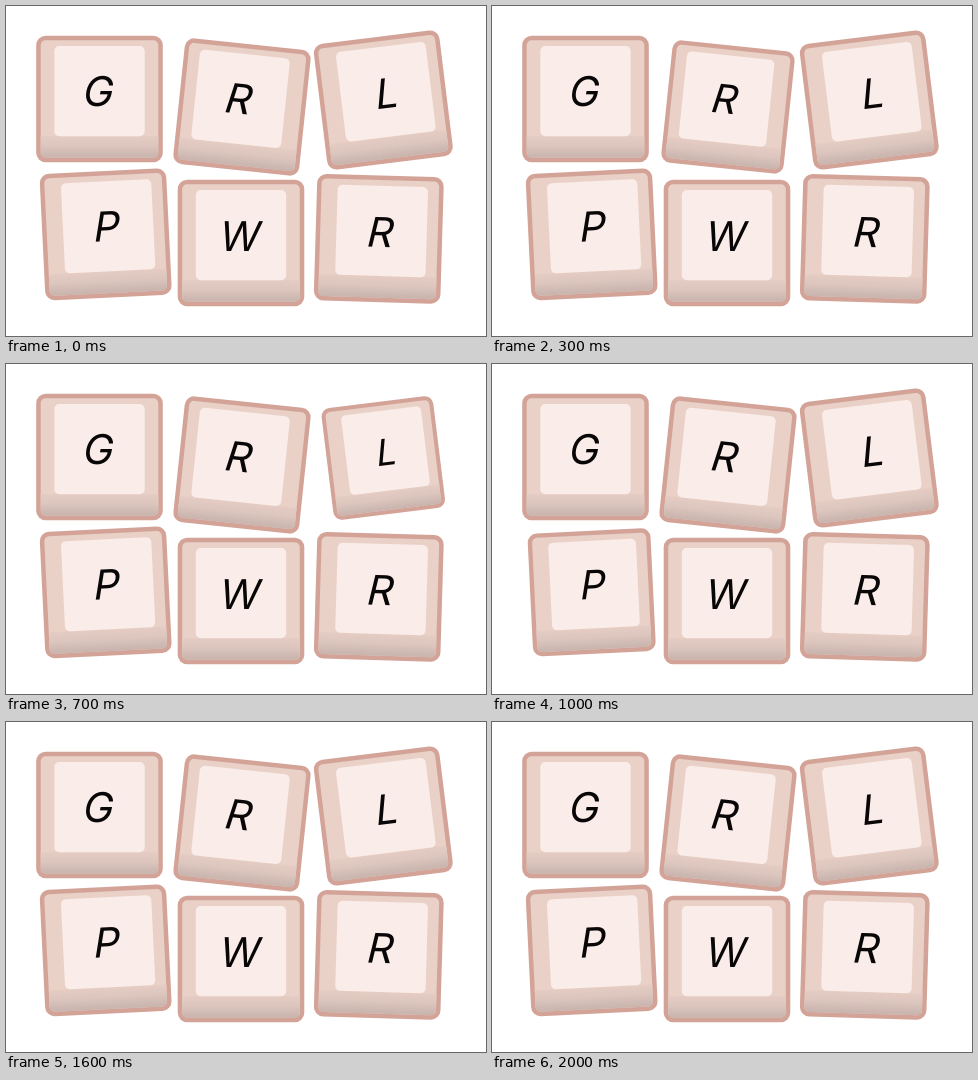
These frames come from a looping animation (480x330 px, 2.1 s). An HTML page with a canvas:

```html
<!DOCTYPE html>
<html lang="en">
<head>
<meta charset="utf-8">
<title>Keycaps</title>
<style>
html, body { margin: 0; width: 480px; height: 330px; overflow: hidden; background: #fff; }
canvas { display: block; }
</style>
</head>
<body>
<canvas id="stage" width="480" height="330"></canvas>
<script>
const ctx = document.getElementById('stage').getContext('2d');
const LOOP = 2100, STEP = 100, PRESS = 250, DEPTH = 0.15;
const SLANT = -0.045;

// Centre, tilt in degrees, sideways shift of the top face,
// letter offset inside the key, start of the press
const keys = [
  { char: 'G', x: 93.5, y: 93, tilt: 0, face: 0, dx: 0, dy: -8, start: 25 },
  { char: 'R', x: 236, y: 101, tilt: 6, face: -2.3, dx: -2.9, dy: -8.2, start: 275 },
  { char: 'L', x: 377.3, y: 94, tilt: -7, face: 3.5, dx: 3.5, dy: -6.6, start: 625 },
  { char: 'P', x: 99.7, y: 228.3, tilt: -2.8, face: 2.8, dx: 2.7, dy: -8.2, start: 975 },
  { char: 'W', x: 235, y: 237, tilt: 0, face: 0, dx: 2.5, dy: -7.5, start: 1325 },
  { char: 'R', x: 372.8, y: 232.8, tilt: 1.7, face: 2.6, dx: 2.5, dy: -6.9, start: 1725 }
];

const shade = ctx.createLinearGradient(0, 36, 0, 59);
shade.addColorStop(0, '#e6cdc4');
shade.addColorStop(0.45, '#dcc6be');
shade.addColorStop(1, '#c8b3ad');

function box(x, y, w, h, r, fill) {
  ctx.fillStyle = fill;
  ctx.beginPath();
  ctx.roundRect(x, y, w, h, r);
  ctx.fill();
}

function drawLetter(char, x, y) {
  ctx.font = 'italic 400 41px Inter, "Liberation Sans", sans-serif';
  ctx.fillStyle = '#080606';
  ctx.translate(x, y);
  ctx.transform(1, 0, SLANT, 1, 0, 0);
  const m = ctx.measureText(char);
  ctx.fillText(char,
    (m.actualBoundingBoxLeft - m.actualBoundingBoxRight) / 2,
    (m.actualBoundingBoxAscent - m.actualBoundingBoxDescent) / 2);
}

function keyScale(t, start) {
  const p = (t - start) / PRESS;
  return p > 0 && p < 1 ? 1 - DEPTH * Math.sin(Math.PI * p) ** 1.4 : 1;
}

function drawKey(key, t) {
  const s = keyScale(t, key.start);
  ctx.save();
  ctx.translate(key.x, key.y);
  ctx.rotate(key.tilt * Math.PI / 180);
  ctx.scale(s, s);
  box(-63.3, -63.3, 126.6, 126.6, 9.5, '#d3a398');
  box(-58.8, -58.8, 117.6, 117.6, 5, '#e9d1c8');
  box(-58.8, 37, 117.6, 21.8, [0, 0, 5, 5], shade);
  box(key.face - 45.2, -53, 90.4, 90.2, 5, '#faece8');
  drawLetter(key.char, key.dx, key.dy);
  ctx.restore();
}

function draw(now) {
  const t = Math.floor(now % LOOP / STEP) * STEP;
  ctx.fillStyle = '#fff';
  ctx.fillRect(0, 0, 480, 330);
  keys.forEach(key => drawKey(key, t));
}

let origin;
function tick(now) {
  origin ??= now;
  draw(Math.max(0, now - origin));
  requestAnimationFrame(tick);
}
draw(0);
requestAnimationFrame(tick);
</script>
</body>
</html>
```
